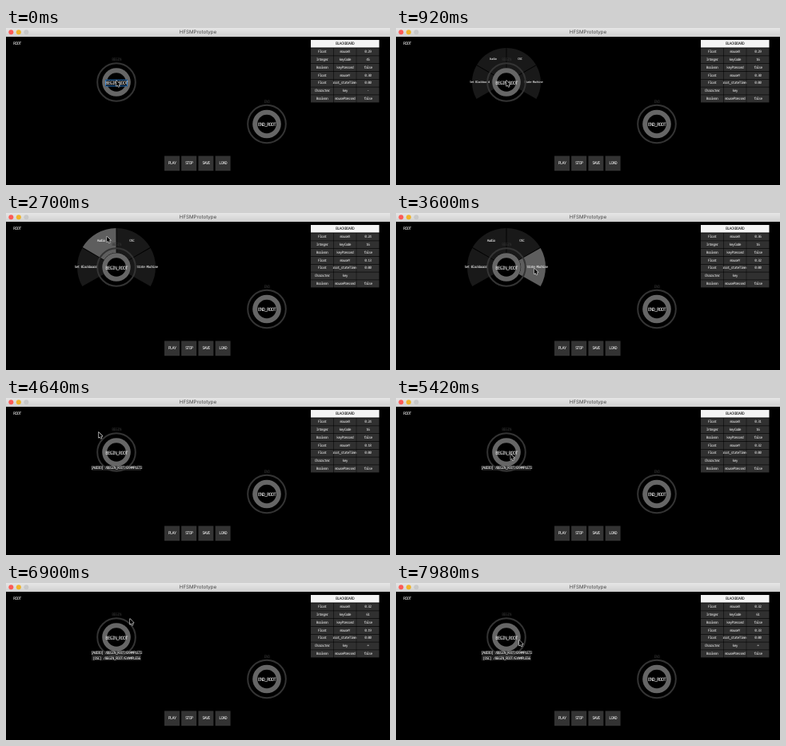
Recreate the animation shown at these times as an HTML page with a canvas. Size 480x197 px, loop 8 s.

```html
<!DOCTYPE html>
<html lang="en">
<head>
<meta charset="utf-8">
<title>HFSMPrototype</title>
<style>
html, body { margin: 0; width: 100%; height: 100%; overflow: hidden; background: #000; }
canvas { display: block; width: 480px; height: 197px; }
</style>
</head>
<body>
<canvas id="stage"></canvas>
<script>
const LOOP = 8000, W = 480, H = 197, BAR = 11;
const BEGIN = { x: 138, y: 68 }, END = { x: 326, y: 120.5 };
const HOME = { x: 138, y: 66 };
const canvas = document.getElementById('stage');
const ctx = canvas.getContext('2d');
const ratio = Math.max(1, window.devicePixelRatio || 1);
canvas.width = W * ratio;
canvas.height = H * ratio;

// The pointer sweeps around HOME, resting between these moves
const moves = [
  { from: 1650, to: 2000, angle: 192, radius: 40 },
  { from: 2180, to: 3500, angle: 366, radius: 35 },
  { from: 3640, to: 4120, angle: 226, radius: 32 },
  { from: 4700, to: 5560, angle: 413, radius: 5 },
  { from: 6220, to: 6480, angle: 309, radius: 27 },
  { from: 6940, to: 7600, angle: 188, radius: 28 },
  { from: 7640, to: 7920, angle: 380, radius: 17 }
];
const menus = [{ open: 680, close: 4340 }, { open: 5980, close: 6500 }];
const sectors = ['Set Blackboard', 'Audio', 'OSC', 'State Machine'];

const clamp = v => Math.min(1, Math.max(0, v));
const smooth = u => u * u * (3 - 2 * u);
const radians = degrees => degrees * Math.PI / 180;

function pointer(t) {
  let angle = moves[0].angle, radius = 0;
  for (const move of moves) {
    const e = smooth(clamp((t - move.from) / (move.to - move.from)));
    angle += (move.angle - angle) * e;
    radius += (move.radius - radius) * e;
    if (e < 1) break;
    angle = move.angle % 360 + (move.angle > 400 ? 360 : 0);
  }
  return {
    x: HOME.x + radius * Math.cos(radians(angle)),
    y: HOME.y + radius * Math.sin(radians(angle))
  };
}

function menuScale(t) {
  return Math.max(...menus.map(({ open, close }) =>
    Math.min(clamp((t - open) / 275), clamp((close + 240 - t) / 240))));
}

function write(str, x, y, font, color, align, spacing) {
  ctx.font = font;
  ctx.letterSpacing = `${spacing}px`;
  ctx.textRendering = 'geometricPrecision';
  ctx.textAlign = align;
  ctx.textBaseline = 'middle';
  ctx.fillStyle = color;
  ctx.fillText(str, x, y);
}

function text(str, x, y, size, color = '#fff', align = 'center') {
  write(str, x, y, `${size}px "Noto Sans Mono", monospace`, color, align, -0.14 * size);
}

function rect(x, y, w, h, color) {
  ctx.fillStyle = color;
  ctx.fillRect(x, y, w, h);
}

function disc(x, y, r, color) {
  ctx.fillStyle = color;
  ctx.beginPath();
  ctx.arc(x, y, r, 0, 7);
  ctx.fill();
}

function titleBar() {
  const shade = ctx.createLinearGradient(0, 0, 0, BAR);
  shade.addColorStop(0, '#e6e6e6');
  shade.addColorStop(1, '#d0d0d0');
  rect(0, 0, W, BAR, shade);
  ['#fc5b57', '#f0b429', '#c8c8c8'].forEach((c, i) => disc(6.3 + 9.5 * i, 5.3, 3, c));
  write('HFSMPrototype', 240, 5.5, '6.2px Inter, sans-serif', '#444', 'center', 0);
}

function blackboard(t) {
  const p = pointer(t - 80);
  const [code, key] = t < 560 ? [45, '-'] : t < 5700 ? [16, ''] : [61, '='];
  const rows = [
    ['Float', 'mouseX', (p.x / W).toFixed(2)],
    ['Integer', 'keyCode', code],
    ['Boolean', 'keyPressed', 'false'],
    ['Float', 'mouseY', ((p.y - 10) / (H - 10)).toFixed(2)],
    ['Float', 'root_stateTimer', '0.00'],
    ['Character', 'key', key],
    ['Boolean', 'mousePressed', 'false']
  ];
  rect(381, 15, 85.5, 9.5, '#f4f4f4');
  text('BLACKBOARD', 423.5, 20, 5, '#111');
  rows.forEach((row, r) => row.forEach((value, c) => {
    const x = 381 + c * 28.6, y = 25.4 + r * 9.8;
    rect(x, y, 28.2, 9.2, '#303030');
    text(value, x + 14.1, y + 4.6, 4.5, '#eee');
  }));
}

function menu(scale, cursor) {
  if (!scale) return;
  const dx = cursor.x - BEGIN.x, dy = cursor.y - BEGIN.y;
  const turn = (Math.atan2(dy, dx) * 180 / Math.PI + 570) % 360;
  const hovered = scale === 1 && Math.hypot(dx, dy) > 25 ? Math.floor(turn / 60) : -1;
  ctx.save();
  ctx.translate(BEGIN.x, BEGIN.y);
  ctx.scale(scale, scale);
  sectors.forEach((label, i) => {
    const start = radians(150 + 60 * i), end = start + Math.PI / 3;
    ctx.beginPath();
    ctx.arc(0, 0, 49, start + 0.01, end - 0.01);
    ctx.arc(0, 0, 18, end - 0.02, start + 0.02, true);
    ctx.fillStyle = i === hovered ? '#5e5e5e' : '#191919';
    ctx.fill();
  });
  sectors.forEach((label, i) => {
    const a = Math.PI * (1 + i / 3);
    text(label, 38.4 * Math.cos(a), 38.4 * Math.sin(a), 4.4);
  });
  ctx.restore();
}

function node({ x, y }, label, name) {
  text(label, x, y - 28, 5, '#333');
  ctx.lineWidth = 2;
  ctx.strokeStyle = '#343434';
  ctx.beginPath();
  ctx.arc(x, y, 23.8, 0, 7);
  ctx.stroke();
  disc(x, y, 17.8, '#666');
  disc(x, y, 11.8, '#000');
  text(name, x, y + 1.2, 6);
}

function action(label, y) {
  rect(107, y - 3, 62, 6, 'rgba(50,50,50,.65)');
  text(label, BEGIN.x, y, 4.8);
}

function arrow({ x, y }) {
  const shape = [[0, 0], [0, 6.8], [1.6, 5.4], [2.7, 7.9], [3.8, 7.4], [2.8, 5], [4.8, 4.8]];
  ctx.beginPath();
  shape.forEach(([dx, dy]) => ctx.lineTo(x + dx, y + dy));
  ctx.closePath();
  ctx.lineWidth = 1.2;
  ctx.lineJoin = 'round';
  ctx.strokeStyle = '#ddd';
  ctx.stroke();
  ctx.fillStyle = '#000';
  ctx.fill();
}

function draw(t) {
  const cursor = pointer(t);
  ctx.setTransform(ratio, 0, 0, ratio, 0, 0);
  rect(0, 0, W, H, '#000');
  titleBar();
  text('ROOT', 9, 19.3, 5.2, '#fff', 'left');
  blackboard(t);
  ['PLAY', 'STOP', 'SAVE', 'LOAD'].forEach((label, i) => {
    const x = 198 + 21.2 * i;
    rect(x, 160.5, 19, 18.7, '#333');
    text(label, x + 9.5, 170, 5.2);
  });
  node(END, 'END', 'END_ROOT');
  menu(menuScale(t), cursor);
  node(BEGIN, 'BEGIN', 'BEGIN_ROOT');
  if (t < 440) {
    rect(124, 64.8, 28, 8.4, '#000');
    ctx.lineWidth = 1;
    ctx.strokeStyle = '#2878c8';
    ctx.strokeRect(124.5, 65.2, 27, 7.6);
    text('BEGIN_ROOT', BEGIN.x, BEGIN.y + 1.2, 6);
  }
  if (t >= 4340) action('[AUDIO] /BEGIN_ROOT/EXAMPLE72', 88);
  if (t >= 6500) action('[OSC] /BEGIN_ROOT/EXAMPLE56', 94.3);
  arrow(cursor);
}

const began = performance.now();
function tick() {
  draw((performance.now() - began) % LOOP);
  requestAnimationFrame(tick);
}
tick();
</script>
</body>
</html>
```
